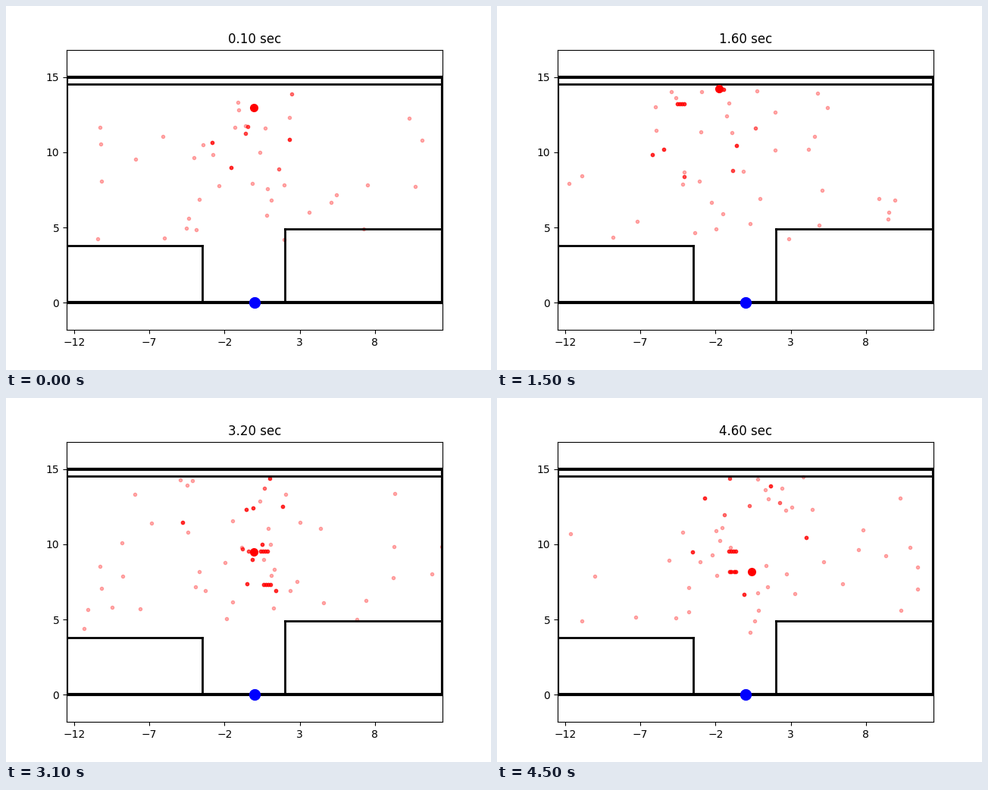
Write a matplotlib script that moves like this. It is 640x480 px and loops after 4.6 s.

```python
import numpy as np
import matplotlib.pyplot as plt
from matplotlib.animation import FuncAnimation

FRAMES, STEP = 46, 100
HALF, MID_Y = 12.5, 7.5

# Key points of the estimated position: time step, x, y
ESTIMATE = [
    (0, -0.05, 12.96), (10, -5.58, 14.0), (15, -1.76, 14.2), (22, -0.35, 9.28),
    (31, -0.04, 9.5), (37, 0.57, 8.12), (45, 0.42, 8.18)]

# Rows of strong hypotheses sliding sideways: first, end, x at first, x at end, y
ROWS = [(5, 13, -4.5, -6.8, 14.0), (13, 26, -4.1, -5.4, 13.2),
        (17, 35, -0.1, 1.1, 7.3), (26, 46, 1.15, -1.0, 9.52),
        (33, 46, 0.3, -0.95, 8.17)]


def estimate(n):
    keys, xs, ys = zip(*ESTIMATE)
    return np.interp(n, keys, xs), np.interp(n, keys, ys)


def make_survivors(count=80):
    """Resampled particles that live for a few steps near the estimate."""
    rng = np.random.default_rng(12)
    found = []
    for _ in range(count):
        birth = rng.integers(-7, FRAMES)
        x = estimate(birth)[0] * 0.7 + rng.normal(0, 2)
        y = np.clip(rng.normal(11, 2.6), 4.6, 14.4)
        found.append((birth, rng.integers(4, 11), x, y, rng.normal(0, 0.08)))
    return found


SURVIVORS = make_survivors()


def injected(n):
    """Fresh particles, denser towards the middle."""
    rng = np.random.default_rng(700 + n)
    wide, near = rng.integers(22, 31), rng.integers(10, 19)
    x = np.concatenate([rng.uniform(-HALF, HALF, wide), rng.normal(0, 3, near)])
    return list(zip(x, rng.uniform(4.05, 14.5, wide + near)))


def particles(n):
    pts = injected(n)
    for birth, life, x, y, drift in SURVIVORS:
        age = n - birth
        if 0 <= age < life:
            pts += [(x + drift * age, y)] * min(age + 1, 4)
    for first, end, x0, x1, y in ROWS:
        if first <= n < end:
            x = x0 + (x1 - x0) * (n - first) / (end - first)
            for dx in (-0.22, -0.08, 0.08, 0.22):
                pts += [(x + dx, y)] * 4
    return np.transpose(pts)


fig, ax = plt.subplots(figsize=(6.4, 4.8), dpi=100)
span = HALF * 369.6 / 496  # equal scale on both axes
ax.set(xlim=(-HALF, HALF), ylim=(MID_Y - span, MID_Y + span),
       xticks=range(-12, 9, 5), yticks=range(0, 16, 5))

cloud, = ax.plot([], [], "r.", alpha=0.3, zorder=1.5)


def wall(xs, ys, lw=2):
    ax.plot(xs, ys, "k", lw=lw)


for level in (0, 15):
    wall([-HALF, HALF], [level, level], 3)
for side in (-HALF, HALF):
    wall([side, side], [0, 15], 3)
wall([-HALF, HALF], [14.53, 14.53])
for edge, inner, top in ((-HALF, -3.5, 3.8), (HALF, 2, 4.9)):
    wall([edge, inner], [top, top])
    wall([inner, inner], [0, top])

ax.plot(0, 0, "bo", ms=10)
guess, = ax.plot([], [], "ro", ms=7)
title = ax.set_title("")


def update(n):
    cloud.set_data(*particles(n))
    x, y = estimate(n)
    guess.set_data([x], [y])
    title.set_text(f"{(n + 1) / 10:.2f} sec")
    return cloud, guess, title


anim = FuncAnimation(fig, update, frames=FRAMES, interval=STEP,
                     repeat=True, repeat_delay=0)
plt.show()
```
